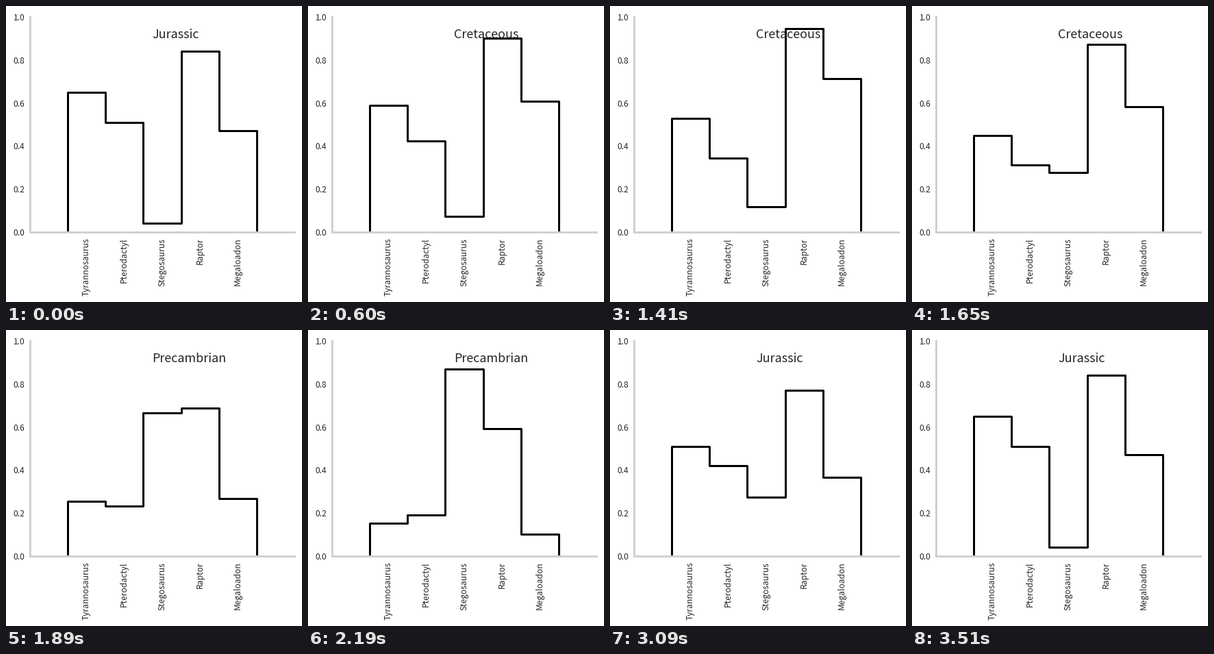
These frames come from a looping animation (432x432 px, 4800 ms). A matplotlib script:

```python
import matplotlib.pyplot as plt
import numpy as np
from matplotlib.animation import FuncAnimation
from matplotlib.transforms import Affine2D

SIZE = 432
LEFT, BASE = 34.8, 330          # plot origin, pixels from the top left
UNIT_X, UNIT_Y = 55.2, 314      # pixels per data unit
STEPS, FRAMES, INTERVAL = 40, 160, 30

INK = "#262626"
SPINE = "#d0d0d0"

NAMES = ["Tyrannosaurus", "Pterodactyl", "Stegosaurus", "Raptor", "Megaloadon"]
ERAS = [
    ("Jurassic", [0.6488, 0.510, 0.040, 0.840, 0.47287]),
    ("Cretaceous", [0.537, 0.348, 0.100, 0.955, 0.7268]),
    ("Precambrian", [0.147, 0.188, 0.8812, 0.587, 0.092]),
]

plt.rcParams["font.family"] = ["Noto Sans CJK JP", "DejaVu Sans"]

fig = plt.figure(figsize=(6, 6), dpi=72, facecolor="white")
ax = fig.add_axes([LEFT / SIZE, 1 - BASE / SIZE,
                   7 * UNIT_X / SIZE, UNIT_Y / SIZE])
ax.set(xlim=(-1, 6), ylim=(0, 1), xticks=[], yticks=[], facecolor="white")
for side, spine in ax.spines.items():
    spine.set_visible(side in ("left", "bottom"))
    spine.set(color=SPINE, linewidth=3)

# Text is placed in pixels, y pointing down
pixels = Affine2D().scale(1, -1).translate(0, SIZE)


def label(x, y, text, size=12, **kw):
    return ax.text(x, y, text, fontsize=size, color=INK,
                   transform=pixels, va="baseline", **kw)


for v in np.linspace(0, 1, 6):
    label(27.3, BASE - UNIT_Y * v + 5, f"{v:.1f}", ha="right")
for i, name in enumerate(NAMES):
    label(LEFT + UNIT_X * (i + 1.5) + 3.2, 338.7, name, ha="right",
          rotation=90, rotation_mode="anchor")
title = label(213.5, 47, "", size=18, ha="left")

edges = np.repeat(np.arange(6), 2)
outline, = ax.plot(edges, np.zeros(12), color="black", linewidth=3,
                   solid_capstyle="butt", solid_joinstyle="round")


def ease(t):
    return 4 * t**3 if t < 0.5 else 1 - 4 * (1 - t)**3


def draw(frame):
    leg, step = divmod(frame, STEPS)
    if leg < len(ERAS):
        t = step / (STEPS - 1)
    else:
        leg, t = len(ERAS) - 1, 1    # rest on the first era
    old_name, old = ERAS[leg]
    new_name, new = ERAS[(leg + 1) % len(ERAS)]
    heights = np.array(old) + (np.array(new) - np.array(old)) * ease(t)
    outline.set_ydata(np.concatenate([[0], np.repeat(heights, 2), [0]]))
    title.set_text(old_name if t < 0.5 else new_name)
    return outline, title


anim = FuncAnimation(fig, draw, frames=FRAMES, interval=INTERVAL,
                     init_func=lambda: draw(0), repeat=True, repeat_delay=0)
plt.show()
```
